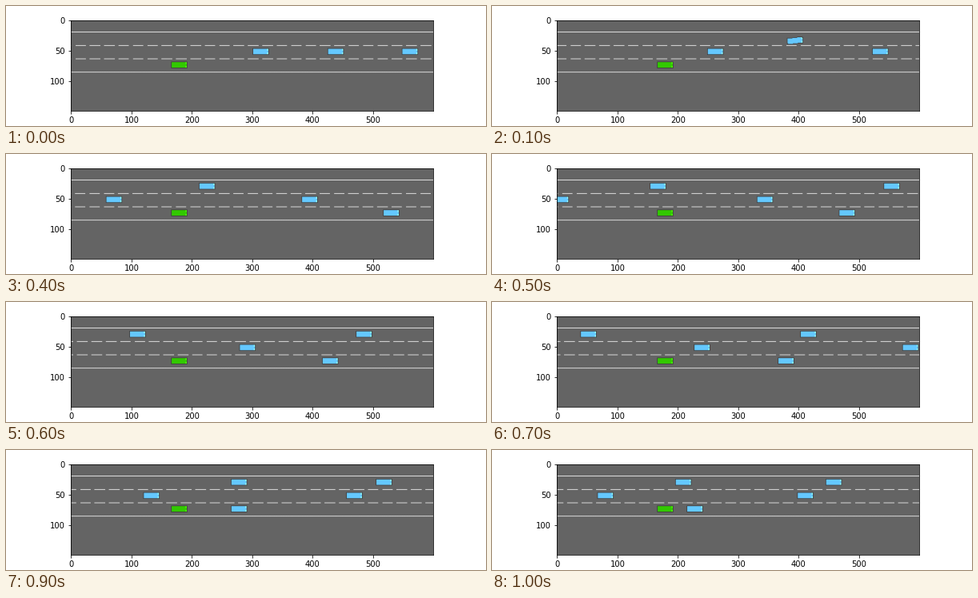
Recreate the animation shown at these times as a matplotlib script. Size 600 by 150 pixels, loop 1.1 s.

```python
import numpy as np
import matplotlib.pyplot as plt
from matplotlib.animation import FuncAnimation

FRAMES, INTERVAL = 11, 100       # one frame per simulated second
W, H, DPI = 600, 150, 72
SCALE = 5.5                      # road pixels per metre
ROAD, WHITE, DARK = (100, 100, 100), (255, 255, 255), (60, 60, 60)
GREEN, BLUE = (50, 200, 0), (100, 200, 255)
LANES, LANE_W, ROAD_TOP = 3, 22, 20
CAR_L, CAR_W = 27, 11
DASH, PERIOD, FIRST_DASH = 3 * SCALE, 4.33 * SCALE, 8
EGO_X = 166
YY, XX = np.mgrid[:H, :W]

# lane, target lane, start (m), first speed, cruising speed (m/s)
TRAFFIC = [
    (1, 1, 54.7, 18.2, 18.2),
    (1, 0, 77.3, 19.55, 19.55),
    (1, 1, 99.6, 23.45, 20.27),
    (2, 2, 127.6, 20.85, 20.85),
    (0, 0, 158.2, 17.45, 17.45),
    (1, 1, 174.8, 19.45, 19.45),
    (0, 0, 187.9, 19.0, 19.0),
]


def settle(t, tau):
    """Ease from 0 to 1 with time constant tau."""
    return 1 - np.exp(-t / tau)


def distance(t, v0, v, tau):
    """Metres covered while the speed settles from v0 to v."""
    return v * t + (v0 - v) * tau * settle(t, tau)


def camera(t):
    return distance(t, 25, 30, 0.6)


def lighten(color):
    return tuple(min(int(c / 0.68), 255) for c in color)


def draw_car(img, left, lane, color, heading=0.0):
    top = round(ROAD_TOP + LANE_W * lane + 5)
    dx, dy = XX - round(left) - CAR_L // 2, YY - top - CAR_W // 2
    c, s = np.cos(heading), np.sin(heading)
    u = np.rint(c * dx - s * dy) + CAR_L // 2
    v = np.rint(s * dx + c * dy) + CAR_W // 2

    def box(x, y, w, h, fill):
        img[(u >= x) & (u < x + w) & (v >= y) & (v < y + h)] = fill

    box(0, 0, CAR_L, CAR_W, DARK)
    box(1, 1, CAR_L - 2, CAR_W - 2, color)
    for y in (1, 7):                             # headlights
        box(CAR_L - 3, y, 2, 3, lighten(color))


def draw_road(img, t):
    first = (FIRST_DASH - SCALE * camera(t)) % PERIOD - PERIOD
    for k in range(LANES + 1):
        y = ROAD_TOP + LANE_W * k
        if k in (0, LANES):
            img[y] = WHITE
            continue
        for x in np.arange(first, W, PERIOD):
            img[y, max(int(x), 0):max(int(x + DASH) + 1, 0)] = WHITE


def scene(t):
    img = np.full((H, W, 3), ROAD, np.uint8)
    draw_road(img, t)
    turn = settle(t, 0.6)
    for lane, goal, start, v0, v in TRAFFIC:
        x = SCALE * (start + distance(t, v0, v, 2.2) - camera(t))
        heading = 0.21 * (lane - goal) * np.sin(np.pi * turn)
        draw_car(img, x, lane + (goal - lane) * turn, BLUE, heading)
    draw_car(img, EGO_X, LANES - 1, GREEN)
    return img


fig, ax = plt.subplots(figsize=(W / DPI, H / DPI), dpi=DPI)
fig.subplots_adjust(left=0.125, right=0.9, bottom=0.125, top=0.88)
view = ax.imshow(scene(0))
ax.set_xticks(range(0, W, 100))
ax.set_yticks(range(0, H, 50))


def update(i):
    view.set_data(scene(i))
    return [view]


anim = FuncAnimation(fig, update, frames=FRAMES, interval=INTERVAL,
                     repeat=True, repeat_delay=0, blit=False)
plt.show()
```
